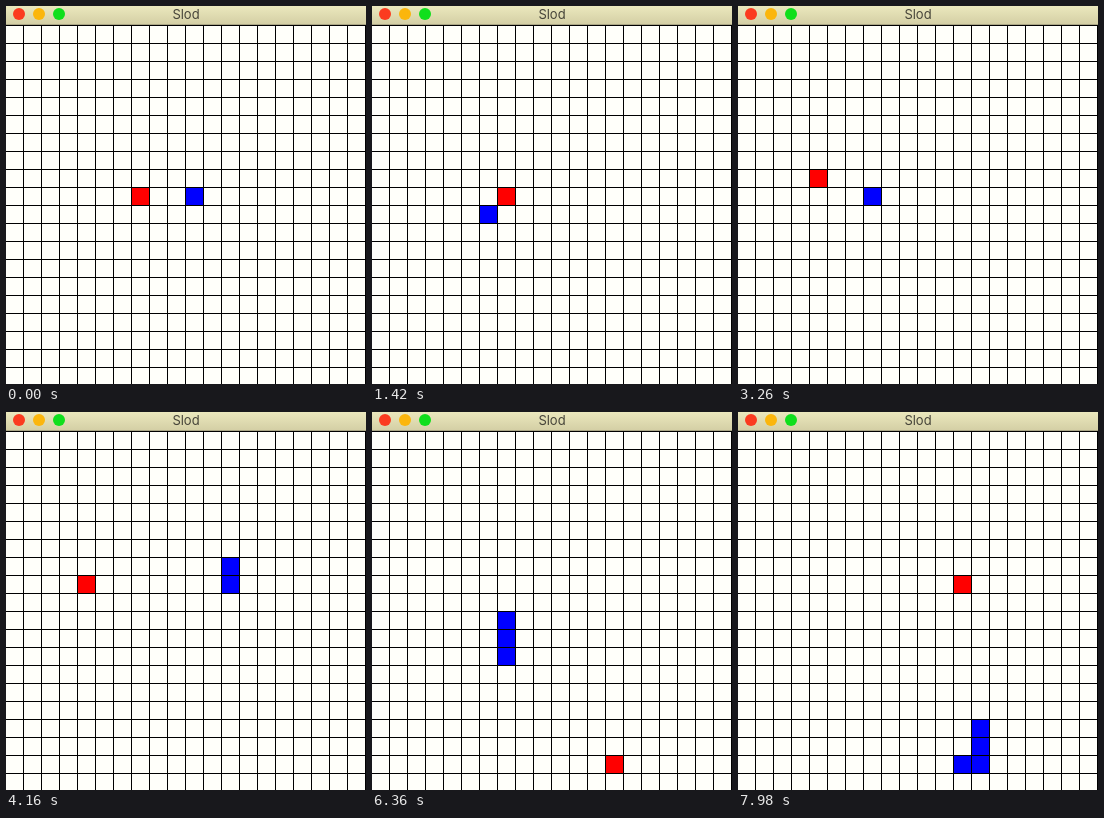
These frames come from a looping animation (360 by 378 pixels, 8000 ms). An HTML page:

```html
<!DOCTYPE html>
<html lang="en">
<head>
<meta charset="utf-8">
<title>Slod</title>
<style>
  html, body { margin: 0; width: 100%; height: 100%; overflow: hidden; background: #fffffa; }
  svg { display: block; }
  text { font: 13px Inter, Roboto, sans-serif; fill: #47453a; }
</style>
</head>
<body>
<svg width="360" height="378" viewBox="0 0 360 378">
  <defs>
    <linearGradient id="bar" x2="0" y2="1">
      <stop offset="0" stop-color="#ebe8bd"/>
      <stop offset="1" stop-color="#d3cea4"/>
    </linearGradient>
    <pattern id="grid" y="19" width="18" height="18" patternUnits="userSpaceOnUse">
      <path d="M0 0H18V18H17V1H0Z"/>
    </pattern>
  </defs>
  <rect width="360" height="378" fill="#fffffa"/>
  <rect y="19" width="360" height="359" fill="url(#grid)" shape-rendering="crispEdges"/>
  <g id="board" shape-rendering="crispEdges"></g>
  <rect width="360" height="19" fill="url(#bar)"/>
  <rect y="18" width="360" height="1" fill="#aaa685"/>
  <circle cx="13" cy="8" r="6" fill="#fb3b1f"/>
  <circle cx="33" cy="8" r="6" fill="#fbb60c"/>
  <circle cx="53" cy="8" r="6" fill="#10df1c"/>
  <text x="180" y="13" text-anchor="middle">Slod</text>
</svg>
<script>
const LOOP = 8000, STEP = 106.4, PHASE = 0.5, CELL = 18, TOP = 20;
const ROUTE = 'U4 L4 D7 R6 U4 L5 D1 R3 U2 R2 D2 L8 U2 R2 D5 R1 U2 R1 D6 R5 D2 L1';
const FOOD = [[7, 9], [4, 8], [13, 18], [12, 8]];
const DIRS = { U: [0, -1], D: [0, 1], L: [-1, 0], R: [1, 0] };

const path = [[10, 9]];
for (const leg of ROUTE.split(' ')) {
  const [dx, dy] = DIRS[leg[0]];
  for (let n = +leg.slice(1); n > 0; n--) {
    const [x, y] = path[path.length - 1];
    path.push([x + dx, y + dy]);
  }
}

// The snake grows on the step after it eats.
let eaten = 0;
const states = path.map(([x, y], i) => {
  const length = 1 + eaten;
  const [fx, fy] = FOOD[eaten];
  if (x === fx && y === fy) eaten++;
  return { food: FOOD[eaten], body: path.slice(Math.max(0, i + 1 - length), i + 1) };
});

const board = document.getElementById('board');
const square = (color, [x, y]) =>
  `<rect x="${x * CELL}" y="${TOP + y * CELL}" width="17" height="17" fill="${color}"/>`;

let shown = -1;
function draw(now) {
  const time = Math.max(0, now - start) % LOOP;
  const step = Math.min(states.length - 1, Math.floor(time / STEP + PHASE));
  if (step !== shown) {
    shown = step;
    const { food, body } = states[step];
    board.innerHTML = square('#f00', food) + body.map(cell => square('#00f', cell)).join('');
  }
  requestAnimationFrame(draw);
}

const start = performance.now();
draw(start);
</script>
</body>
</html>
```
